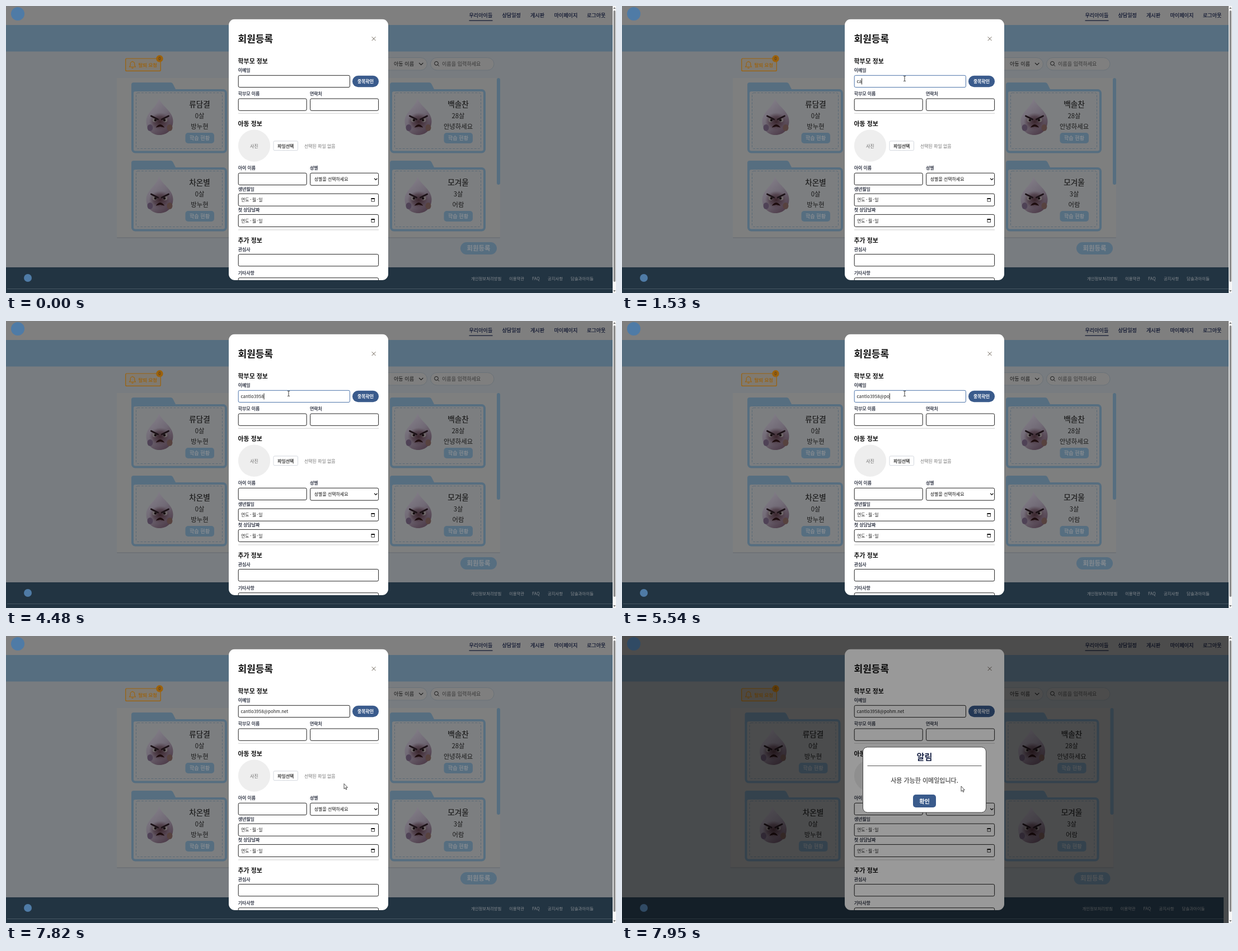
An HTML page for the animation above (8 s loop, 1090x514 px).

```html
<!DOCTYPE html>
<html lang="ko">
<head>
<meta charset="utf-8">
<title>회원등록</title>
<style>
html, body { margin: 0; width: 100%; height: 100%; overflow: hidden; background: #787c80; }
svg { display: block; width: 1090px; height: 514px; }
text { font-family: "Noto Sans CJK KR", "Noto Sans CJK", "Noto Sans KR", sans-serif; white-space: pre; }
.bold { font-weight: 700; }
.mid { stroke: currentColor; stroke-width: .22px; }
</style>
</head>
<body>
<svg id="stage" viewBox="0 0 1090 514" xmlns="http://www.w3.org/2000/svg">
  <defs>
    <linearGradient id="skin" x1=".2" y1="0" x2=".75" y2="1">
      <stop offset="0" stop-color="#85818a"/>
      <stop offset=".5" stop-color="#716a76"/>
      <stop offset="1" stop-color="#4c3a48"/>
    </linearGradient>
    <radialGradient id="face">
      <stop offset="0" stop-color="#3a262d"/>
      <stop offset=".6" stop-color="#4e3c47" stop-opacity=".8"/>
      <stop offset="1" stop-color="#5a4a55" stop-opacity="0"/>
    </radialGradient>
    <g id="drop">
      <path d="M-1-33C2-20 24-10 24 8C24 24 13 33 0 33C-13 33-24 24-24 8C-24-8-5-16-1-33Z" fill="url(#skin)"/>
      <ellipse cx="1" cy="9" rx="20" ry="16" fill="url(#face)"/>
      <ellipse cx="-17" cy="20" rx="5" ry="6" fill="#4f4256"/>
      <ellipse cx="18" cy="20" rx="5" ry="6" fill="#57423f"/>
      <circle cx="-9" cy="6" r="4" fill="#6d6668"/>
      <circle cx="10" cy="6" r="4" fill="#6d6668"/>
      <circle cx="-7.5" cy="6.5" r="2.2" fill="#160d10"/>
      <circle cx="8.5" cy="6.5" r="2.2" fill="#160d10"/>
      <path d="M-15-1L-3 5M16-1L4 5" stroke="#1c1217" stroke-width="3" stroke-linecap="round"/>
      <path d="M-6 19Q1 10 8 19Q1 16-6 19Z" fill="#1d0c0e" stroke="#1d0c0e"/>
    </g>
    <clipPath id="sheet"><rect x="398" y="23.5" width="285" height="467.5" rx="11"/></clipPath>
  </defs>
</svg>
<script>
const stage = document.getElementById('stage');

function add(parent, tag, attrs = {}, content) {
  const node = document.createElementNS(stage.namespaceURI, tag);
  for (const key in attrs) node.setAttribute(key, attrs[key]);
  if (content !== undefined) node.textContent = content;
  parent.append(node);
  return node;
}
const group = (parent, attrs) => add(parent, 'g', attrs);
const box = (parent, x, y, width, height, fill, more) =>
  add(parent, 'rect', { x, y, width, height, fill, ...more });
const line = (parent, d, stroke, width = 1, more) =>
  add(parent, 'path', { d, stroke, 'stroke-width': width, fill: 'none', ...more });
const dot = (parent, cx, cy, r, fill) => add(parent, 'circle', { cx, cy, r, fill });

// y is the visual middle of the glyphs
function label(parent, x, y, size, string, fill, cls = '', anchor = 'start') {
  return add(parent, 'text', {
    x, y: y + size * .37, 'font-size': size, fill, color: fill, class: cls, 'text-anchor': anchor
  }, string);
}

const BLUE = '#566e80', INK = '#1a1a1a', NAVY = '#0f1630', ORANGE = '#9c620c', PALE = '#868b90';
const ACCENT = '#3a5b8c', FOCUS = '#4a72a8', EDGE = '#222';

// ---- dimmed page ----
const page = group(stage);
box(page, 0, 0, 1084, 514, '#787c80');
box(page, 0, 0, 1084, 34, '#7f7f7f');
box(page, 0, 34, 1084, 47.5, BLUE);
dot(page, 21, 14, 12, '#4f7ba6');

[[827.5, '우리아이들'], [886.5, '상담일정'], [937, '게시판'], [979.5, '마이페이지'], [1038, '로그아웃']]
  .forEach(([x, s]) => label(page, x, 16.5, 9.1, s, NAVY, 'mid'));
box(page, 827.5, 25.5, 42, 1.2, NAVY);

// toolbar
box(page, 213.7, 94, 62.6, 22.4, '#807a70', { rx: 2, stroke: ORANGE, 'stroke-width': 1.2 });
line(page, 'M220.5 109H231.5L229.8 106.5V103.5A3.8 3.8 0 0 0 222.2 103.5V106.5ZM224.5 110.5Q226 112 227.5 110.5M226 99.7V98.7',
  ORANGE, 1.1, { 'stroke-linejoin': 'round' });
label(page, 236.5, 105.5, 8.5, '탈퇴 요청', ORANGE, 'mid');
dot(page, 274.5, 94.3, 6.2, ORANGE);
label(page, 274.5, 94.3, 7.9, '0', '#4a3520', '', 'middle');

const pill = { rx: 11.5, stroke: '#6a7278' };
box(page, 640, 92.5, 112.5, 22.5, '#7f7f7f', pill);
label(page, 693, 103.7, 9.1, '아동 이름', INK);
line(page, 'M738 101.8L741.7 105.5L745.4 101.8', INK, 1.1);
box(page, 758.5, 92.5, 113.5, 22.5, '#7f7f7f', pill);
dot(page, 769, 102.8, 3.4, 'none').setAttribute('stroke', INK);
line(page, 'M771.5 105.3L774 107.8', INK);
label(page, 779, 103.7, 9.1, '이름을 입력하세요', '#383838');

// card board
const board = group(page);
box(board, 198, 130, 685, 286, '#6f7377', { rx: 1 });
box(board, 198, 129, 685, 285, '#7e7f7f');
box(board, 877, 129, 6, 191, BLUE, { rx: 3 });

function card(x, y, name, age, teacher) {
  const g = group(board, { transform: `translate(${x} ${y})` });
  add(g, 'path', { d: 'M0 20V4Q0 0 4 0H70Q73 0 74.5 3L80 14V20Z', fill: BLUE });
  box(g, 2, 14, 167, 110.5, '#7c7e80', { rx: 5, stroke: BLUE, 'stroke-width': 4 });
  box(g, 8.5, 18.5, 154, 100, 'none', { rx: 3, stroke: '#5b6a76', 'stroke-dasharray': '4 2.4' });
  add(g, 'use', { href: '#drop', x: 50.5, y: 61 });
  label(g, 122, 39, 13.6, name, INK, 'mid', 'middle');
  label(g, 122, 60, 11.35, age, INK, '', 'middle');
  label(g, 122, 79, 11.35, teacher, INK, '', 'middle');
  box(g, 96.5, 90, 51.5, 19, BLUE, { rx: 5 });
  label(g, 122, 99.7, 9.1, '학습 현황', PALE, 'bold', 'middle');
}
card(224, 137, '류담결', '0살', '방누현');
card(686, 137, '백솔찬', '28살', '안녕하세요');
card(224, 277, '차온별', '0살', '방누현');
card(686, 277, '모겨울', '3살', '어람');

box(board, 812, 423, 65, 22, BLUE, { rx: 11 });
label(board, 844.5, 434, 11.4, '회원등록', PALE, 'bold', 'middle');

// footer
const footer = box(page, 0, 468, 1084, 46, '#223442');
const footLine = box(page, 2, 506, 1082, 1, '#465663');
dot(page, 39, 487, 7, '#4f7ba6');
const links = group(page);
[[831, '개인정보처리방침'], [899, '이용약관'], [940, 'FAQ'], [968, '공지사항'], [1009, '담솔과아이들']]
  .forEach(([x, s]) => label(links, x, 488, 7.38, s, PALE));

// ---- form ----
const form = group(stage, { 'clip-path': 'url(#sheet)' });
box(form, 398, 23.5, 285, 467.5, '#fff');
label(form, 414.5, 59, 17, '회원등록', '#111', 'bold');
line(form, 'M653.7 55.2L660.5 62M660.5 55.2L653.7 62', '#6a6155');

[[99, '학부모 정보'], [211, '아동 정보'], [419.5, '추가 정보']]
  .forEach(([y, s]) => label(form, 414.6, y, 10.9, s, '#111', 'bold'));
[[414.7, 115.5, '이메일'], [414.7, 157.5, '학부모 이름'], [543, 157.5, '연락처'],
 [414.7, 290.5, '아이 이름'], [543, 290.5, '성별'], [414.7, 327.7, '생년월일'],
 [414.7, 365, '첫 상담날짜'], [414.7, 436, '관심사'], [414.7, 478, '기타사항']]
  .forEach(([x, y, s]) => label(form, x, y, 7.95, s, '#1c2233', 'mid'));

const field = (x, y, w, h = 21.3) =>
  box(form, x, y, w, h, '#fff', { rx: 2.4, stroke: EDGE });
const email = field(415.2, 124.3, 199.2);
field(415.2, 166, 122);
field(543.6, 166, 122);
field(415.2, 299.2, 122);
field(543.6, 299.2, 122, 22);
field(415.2, 336.2, 250.4, 22);
field(415.2, 373.4, 250.4, 22);
field(415.2, 444.6, 250.4);
field(415.2, 486.8, 250.4);
box(form, 415, 191.7, 251, 1, '#ccc');
box(form, 415, 400.4, 251, 1, '#ccc');

box(form, 619, 124.7, 47, 20.6, ACCENT, { rx: 10 });
label(form, 642.5, 135, 7.95, '중복확인', '#fff', 'bold', 'middle');

dot(form, 443.5, 250.2, 28.6, '#eee');
label(form, 443.3, 250.7, 7.95, '사진', '#666', '', 'middle');
box(form, 478, 241.9, 43.5, 16.8, '#fff', { rx: 2, stroke: '#d3d7dd' });
label(form, 499.8, 250.6, 7.95, '파일선택', '#222', 'mid', 'middle');
label(form, 533, 250.7, 7.95, '선택된 파일 없음', '#777');

label(form, 550.8, 310.5, 7.95, '성별을 선택하세요', '#111');
line(form, 'M658.2 308.8L660.8 311.4L663.4 308.8', '#111', 1.3);
for (const y of [347.4, 384.6]) {
  [[420, '연도'], [435.7, '-'], [439.7, '월'], [447.9, '-'], [451.2, '일']]
    .forEach(([x, s]) => label(form, x, y, 7.95, s, '#222'));
  box(form, 653, y - 2.8, 5.4, 5.4, 'none', { stroke: '#111', 'stroke-width': .8 });
  box(form, 652.6, y - 3.4, 6.2, 1.9, '#111');
}

const typed = label(form, 419.6, 135, 7.95, '', '#222');
const caret = box(form, 0, 129.5, .9, 11, '#111');

// ---- alert ----
const dim = box(stage, 0, 0, 1084, 514, '#000');
const notice = group(stage);
box(notice, -110, -58.5, 220, 117, '#fff', { rx: 8, stroke: '#444' });
label(notice, 0, -41.5, 15.2, '알림', '#1b2547', 'bold', 'middle');
box(notice, -102, -25.5, 204, 1, '#555');
label(notice, 0, 1, 11, '사용 가능한 이메일입니다.', '#444', 'mid', 'middle');
box(notice, -20.5, 26.5, 41, 23, ACCENT, { rx: 5 });
label(notice, 0, 38.5, 10.1, '확인', '#fff', 'bold', 'middle');

// window scrollbar
box(stage, 1084, 0, 6, 514, '#f7f7f7');
box(stage, 1085.5, 8, 3.5, 486, '#8b8b8b', { rx: 1.7 });
add(stage, 'path', { d: 'M1085 5L1087.2 2L1089.4 5ZM1085 509L1087.2 512L1089.4 509Z', fill: '#777' });

// pointers
const arrow = add(stage, 'path', {
  d: 'M0 0V9.3L2.1 7.4L3.5 10.6L5 9.9L3.6 6.8H6.4Z', fill: '#fff', stroke: '#222', 'stroke-width': .8
});
const beam = line(stage, 'M-2-4.5H-.7L0-4L.7-4.5H2M0-4V4M-2 4.5H-.7L0 4L.7 4.5H2', '#222', .9);

// ---- timeline ----
const LOOP = 8000;
const ADDRESS = 'cantlo3958@pohm.net';
// [time, characters shown]
const KEYS = [[1400, 1], [1530, 2], [1930, 3], [2330, 4], [2470, 5], [2530, 6], [2740, 7], [3070, 6],
  [3740, 7], [3800, 8], [4210, 9], [4480, 10], [4880, 11], [5210, 12], [5540, 13], [5670, 14],
  [5930, 15], [6130, 16], [6330, 17], [6460, 18], [6730, 19]];
// [time, x, y]
const PATH = [[0, 1056, 518], [870, 505, 130], [6860, 505, 130], [7230, 638, 136], [7380, 638, 136],
  [7680, 603, 262], [7750, 604, 264.5], [7880, 606, 269]];
// [time, dim, notice scale]
const NOTICE = [[0, 0, 0], [7880, .14, .75], [7950, .4, 1]];

const latest = (table, t) => table.filter(row => row[0] <= t).pop();
const between = (t, from, to) => t >= from && t < to;
const show = (node, on) => node.setAttribute('visibility', on ? 'visible' : 'hidden');

// the pointer is redrawn on a coarse beat
function beat(t) {
  if (t < 870) return 70 + Math.floor((t - 70) / 80) * 80;
  if (between(t, 6930, 7680)) return 6930 + Math.floor((t - 6930) / 75) * 75;
  return [7880, 7750, 7680].find(b => t >= b) ?? t;
}

function pointerAt(t) {
  const i = PATH.findIndex(p => p[0] > t);
  if (i < 0) return PATH[PATH.length - 1].slice(1);
  const [t0, x0, y0] = PATH[i - 1], [t1, x1, y1] = PATH[i];
  const u = (t - t0) / (t1 - t0), e = u * u * (3 - 2 * u);
  return [x0 + (x1 - x0) * e, y0 + (y1 - y0) * e];
}

function draw(t) {
  const key = latest(KEYS, t);
  typed.textContent = ADDRESS.slice(0, key ? key[1] : 0);
  const focused = between(t, 940, 7305);
  email.setAttribute('stroke', focused ? FOCUS : EDGE);
  caret.setAttribute('x', 419.6 + (key ? typed.getComputedTextLength() : 0));
  show(caret, focused && !between(t, 3270, 3740));

  const [x, y] = pointerAt(Math.max(0, beat(t)));
  const overText = between(x, 415, 614) && between(y, 124, 146);
  for (const p of [arrow, beam]) p.setAttribute('transform', `translate(${x} ${y})`);
  show(arrow, t >= 70 && !overText);
  show(beam, t >= 70 && overText);

  const [, shade, scale] = latest(NOTICE, t);
  const open = scale > 0;
  dim.setAttribute('opacity', shade);
  show(notice, open);
  notice.setAttribute('transform', `translate(540.5 257.5) scale(${scale || 1})`);
  board.setAttribute('transform', `translate(${open ? -4.5 : 0} 0)`);
  links.setAttribute('transform', `translate(${open ? -8.5 : 0} 0)`);
  footer.setAttribute('width', open ? 1075 : 1084);
  footLine.setAttribute('width', open ? 1073 : 1082);
}

const start = performance.now();
function tick() {
  draw((performance.now() - start) % LOOP);
  requestAnimationFrame(tick);
}
draw(0);
requestAnimationFrame(tick);
</script>
</body>
</html>
```
